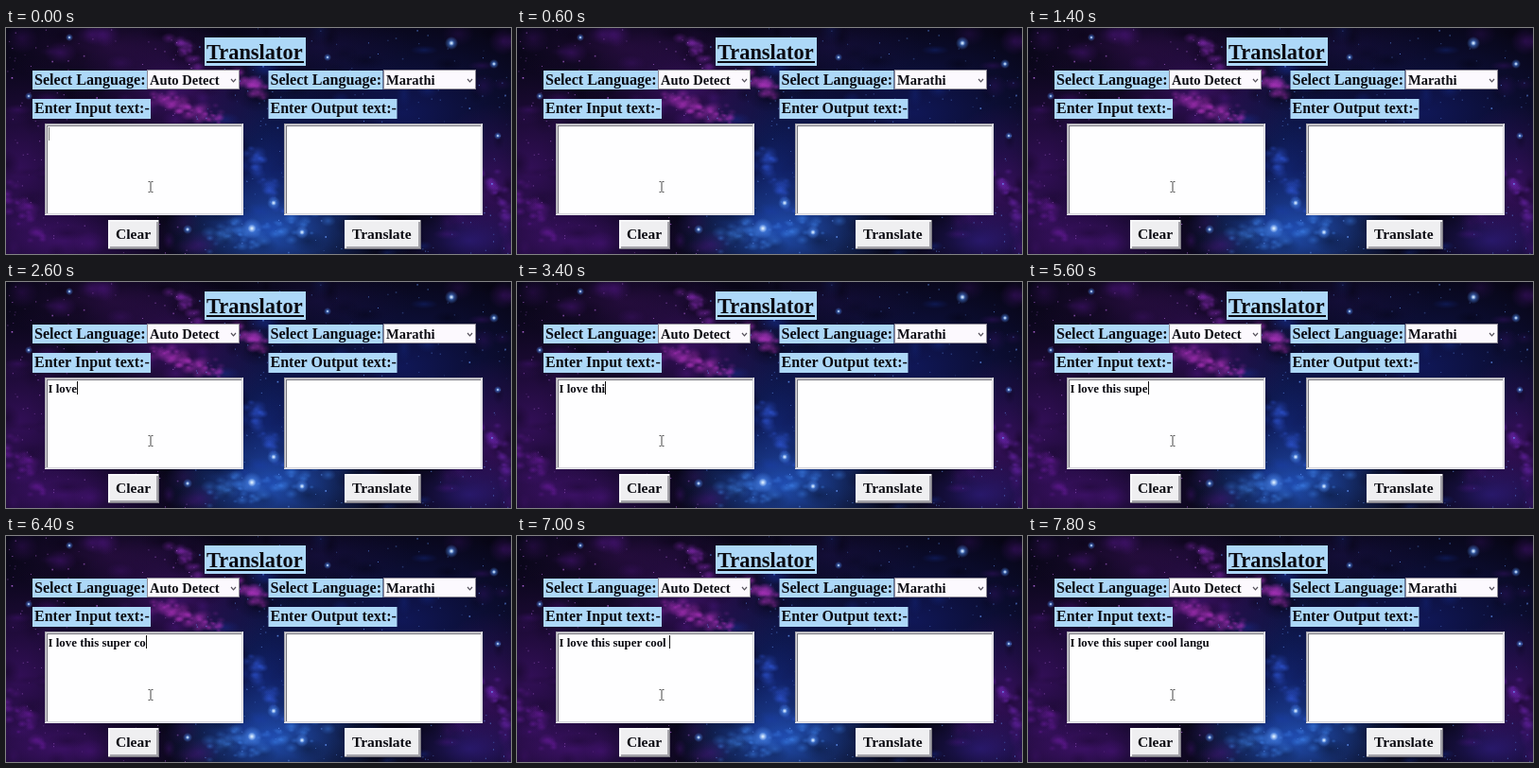
Recreate the animation shown at these times as an HTML page with a canvas. Size 534 px wide and 239 px high, loop 8000 ms.

```html
<!DOCTYPE html>
<html lang="en">
<head>
<meta charset="utf-8">
<title>Translator</title>
<style>
  html, body { margin: 0; width: 100%; height: 100%; overflow: hidden; background: #080617; }
  canvas { display: block; width: 534px; height: 239px; }
</style>
</head>
<body>
<canvas id="stage" width="534" height="239"></canvas>
<script>
const W = 534, H = 239, LOOP = 8000, STEP = 200;
const ctx = document.getElementById('stage').getContext('2d');
const scene = document.createElement('canvas');
scene.width = W;
scene.height = H;

let seed = 73;
function random() {
  seed = (seed * 16807) % 2147483647;
  return seed / 2147483647;
}
const spread = size => (random() + random() - 1) * size;

function rect(g, x, y, w, h, color) {
  g.fillStyle = color;
  g.fillRect(x, y, w, h);
}

function text(g, string, x, baseline, size) {
  g.font = `bold ${size}px "Liberation Serif", "Times New Roman", serif`;
  g.fillStyle = '#0b0b12';
  g.fillText(string, x, baseline);
}

// Soft elliptical glow; rgb is "r,g,b"
function glow(g, x, y, rx, ry, rgb, alpha) {
  g.save();
  g.translate(x, y);
  g.scale(rx, ry);
  const fade = g.createRadialGradient(0, 0, 0, 0, 0, 1);
  fade.addColorStop(0, `rgba(${rgb},${alpha})`);
  fade.addColorStop(0.5, `rgba(${rgb},${alpha * 0.45})`);
  fade.addColorStop(1, `rgba(${rgb},0)`);
  g.fillStyle = fade;
  g.fillRect(-1, -1, 2, 2);
  g.restore();
}

// Ragged cloud strewn along a line
function filament(g, x1, y1, x2, y2, width, rgb, count) {
  for (let i = 0; i < count; i++) {
    const k = random(), r = 2 + random() * 5;
    glow(g, x1 + (x2 - x1) * k + spread(width), y1 + (y2 - y1) * k + spread(width),
      r * 1.4, r, rgb, 0.2 + random() * 0.3);
  }
}

function drawSpace(g) {
  rect(g, 0, 0, W, H, '#080617');
  const violet = '92,24,150', blue = '26,62,190', pink = '176,50,190';
  glow(g, 15, 150, 110, 120, violet, 0.5);
  glow(g, 60, 225, 130, 50, violet, 0.55);
  glow(g, 180, 70, 110, 75, violet, 0.55);
  glow(g, 110, 20, 120, 45, '60,18,90', 0.5);
  glow(g, 275, 150, 100, 120, blue, 0.5);
  glow(g, 285, 215, 120, 65, '40,100,220', 0.75);
  glow(g, 420, 90, 170, 100, '20,32,120', 0.65);
  glow(g, 515, 170, 70, 90, violet, 0.55);
  glow(g, 490, 225, 80, 40, '60,40,170', 0.5);
  glow(g, 330, 20, 100, 40, '30,20,80', 0.5);

  for (let i = 0; i < 170; i++) {
    const x = random() * W, y = random() * H;
    const tint = random() < 0.38 ? '0,0,8' : x < 225 || x > 460 ? violet : blue;
    glow(g, x, y, 6 + random() * 18, 4 + random() * 12, tint, 0.12 + random() * 0.25);
  }
  filament(g, 155, 72, 232, 98, 11, pink, 65);
  filament(g, 178, 12, 204, 40, 9, '130,40,175', 25);
  filament(g, 246, 47, 275, 70, 9, pink, 25);
  filament(g, 0, 170, 38, 224, 15, '112,28,165', 28);
  filament(g, 508, 145, 532, 205, 12, '112,38,180', 26);
  filament(g, 218, 222, 330, 205, 20, '62,130,235', 55);
  filament(g, 256, 125, 288, 190, 13, '48,88,220', 28);

  for (let i = 0; i < 400; i++) {
    const x = random() * W, y = random() * H, size = random() < 0.9 ? 1 : 1.6;
    g.globalAlpha = 0.2 + random() * 0.65;
    rect(g, x, y, size, size, x < 200 ? '#b66be0' : '#699cff');
  }
  g.globalAlpha = 1;
  const stars = [[260, 212, 11], [283, 185, 7], [313, 216, 7], [471, 16, 7], [516, 38, 5],
    [24, 72, 4], [67, 10, 4], [340, 31, 4], [282, 84, 5], [520, 114, 4], [192, 213, 5]];
  for (const [x, y, r] of stars) {
    glow(g, x, y, r, r, '85,150,255', 0.9);
    glow(g, x, y, r / 2.5, r / 2.5, '235,248,255', 1);
  }
}

function label(g, string, x, y, w, h, baseline, size, inset = 2) {
  rect(g, x, y, w, h, '#add8f8');
  text(g, string, x + inset, baseline, size);
}

function comboBox(g, string, x) {
  rect(g, x, 44, 98, 21, '#8d8995');
  rect(g, x + 1, 45, 96, 19, '#fcf9fe');
  text(g, string, x + 3, 59.5, 14.5);
  g.strokeStyle = '#55515b';
  g.lineWidth = 1.2;
  g.beginPath();
  g.moveTo(x + 89, 54);
  g.lineTo(x + 91.5, 56.8);
  g.lineTo(x + 94, 54);
  g.stroke();
}

function textArea(g, x) {
  rect(g, x, 101, 210, 97, '#e9e9ed');
  rect(g, x, 101, 209, 96, '#a4a3aa');
  rect(g, x + 1, 102, 208, 95, '#d8d7dd');
  rect(g, x + 2, 103, 206, 93, '#77767d');
  rect(g, x + 3, 104, 205, 92, '#fefeff');
}

function button(g, string, x, w) {
  rect(g, x, 203, w, 31, '#77757e');
  rect(g, x, 203, w - 1, 30, '#f7f7f9');
  rect(g, x + 2, 205, w - 3, 28, '#a5a4aa');
  rect(g, x + 2, 205, w - 5, 26, '#efeff1');
  text(g, string, x + 8, 223, 15.5);
}

function drawForm(g) {
  label(g, 'Translator', 210, 10, 107, 30, 33, 22.4);
  rect(g, 212, 35, 103, 2, '#0b0b12');
  for (const [x, language, kind] of [[28, 'Auto Detect', 'Input'], [277.5, 'Marathi', 'Output']]) {
    label(g, 'Select Language:', x, 45, 121, 20, 60, 16.1);
    comboBox(g, language, Math.round(x + 121));
    label(g, `Enter ${kind} text:-`, x, 75, kind === 'Input' ? 125 : 136, 21, 90, 16);
  }
  textArea(g, 41);
  textArea(g, 294);
  button(g, 'Clear', 108, 54);
  button(g, 'Translate', 358, 81);
}

function drawPointer(g) {
  rect(g, 152.5, 163, 1, 10, '#444');
  for (const y of [162, 173]) {
    rect(g, 150.5, y, 2, 1, '#555');
    rect(g, 153.5, y, 2, 1, '#555');
  }
}

// One key per step; "<" deletes and "." waits
const KEYS = '.......' + '.I love this ssu<<.upe' + 'r cool lan';
function typedAt(time) {
  let typed = '';
  for (const key of KEYS.slice(0, Math.floor(time / STEP) + 1)) {
    if (key === '<') typed = typed.slice(0, -1);
    else if (key !== '.') typed += key;
  }
  return time >= 7800 ? typed + 'gu' : typed;
}

function draw(time) {
  ctx.drawImage(scene, 0, 0);
  const typed = typedAt(time);
  text(ctx, typed, 44.5, 117, 12.9);
  const blink = time % 900;
  if (blink < 400 || blink >= 700) {
    const x = Math.round(44.5 + ctx.measureText(typed).width);
    rect(ctx, x, 105, 1, 14, typed ? '#111' : '#777');
  }
  drawPointer(ctx);
}

drawSpace(scene.getContext('2d'));
drawForm(scene.getContext('2d'));

const start = performance.now();
function tick() {
  const time = (performance.now() - start) % LOOP;
  draw(Math.floor(time / STEP) * STEP);
  requestAnimationFrame(tick);
}
tick();
</script>
</body>
</html>
```
